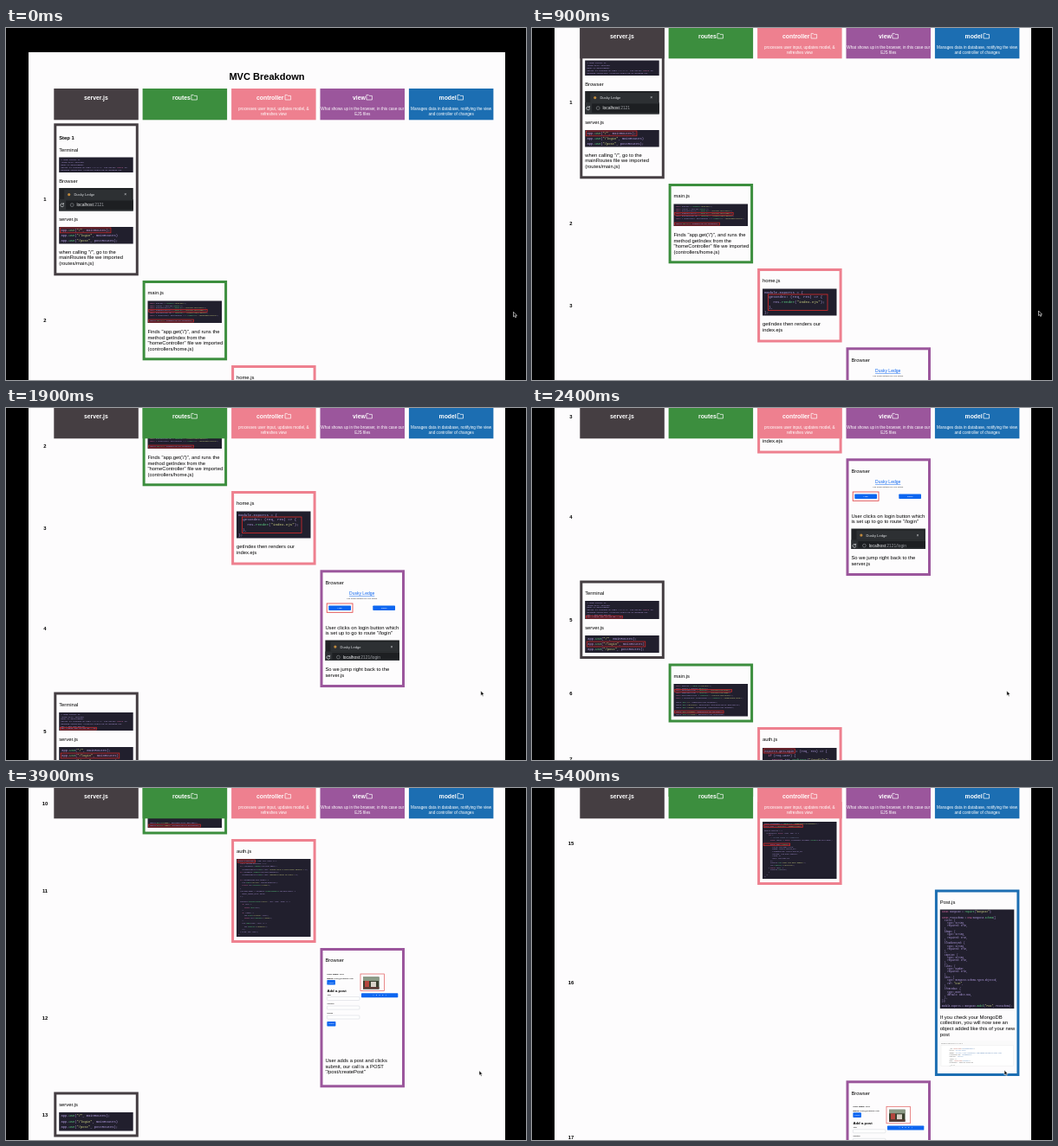
Recreate the animation shown at these times as an HTML page. Size 600 px wide and 407 px high, loop 5500 ms.

```html
<!DOCTYPE html>
<html lang="en">
<head>
<meta charset="utf-8">
<title>MVC Breakdown</title>
<style>
  html, body { margin: 0; width: 100%; height: 100%; overflow: hidden; background: #000; }
  svg { display: block; width: 600px; height: 407px; }
  text { font-family: "Liberation Sans", Arial, sans-serif; white-space: pre; }
  .code { font-family: "Liberation Mono", monospace; }
  .bold { font-weight: 700; }
  .mid { text-anchor: middle; }
  .mark { fill: #d0202018; stroke: #d92b2b; stroke-width: .7; }
</style>
</head>
<body>
<svg viewBox="0 0 600 407">
  <g id="page"></g>
  <g id="head"></g>
  <path id="cursor" d="M0 0V5.6L1.3 4.5L2.2 6.5L3.2 6L2.3 4.1H4Z" fill="#000" stroke="#fff" stroke-width=".6"/>
</svg>
<script>
const PAPER = '#fdfcfd', BLUE = '#0d66f0', BRAND = 'Dusky Ledge', TAGLINE = 'The Social Network For The Future';
const COLS = [55.3, 157.6, 260.1, 362.5, 464.9], WIDE = 97.5;
const HUES = ['#453e42', '#3c8e3e', '#ee808f', '#9b569c', '#1c6eb2'];

const rect = (x, y, w, h, fill, more = '') =>
  `<rect x="${x}" y="${y}" width="${w}" height="${h}" fill="${fill}" ${more}/>`;
const text = (x, y, str, size = 5.85, more = '') =>
  `<text x="${x}" y="${y}" font-size="${size}" ${more}>${str}</text>`;
const left = col => COLS[col] + 5.9;
const note = (col, y, ...lines) => lines.map((s, i) => text(left(col), y + i * 6.6, s)).join('');

// One bordered card with its row number; its file name sits at the top.
function card(row, col, top, bottom, name, body) {
  const h = bottom - top;
  return rect(COLS[col] + 1.5, top + 1.5, WIDE - 3, h - 3, PAPER, `stroke="${HUES[col]}" stroke-width="3"`)
    + text(45, top + h / 2 + 2.1, row, 5.85, 'class="bold mid"')
    + note(col, top + 16.4, name) + body;
}

const TOKEN = /("[^"]*")|(\/\/.*)|\b(const|return|if|new|async|await|try|catch)\b|(\w+)(?=\()/g;
const paint = line => line.replace(TOKEN, (m, str, comment, key) =>
  `<tspan fill="${str ? '#d9df88' : comment ? '#7480a8' : key ? '#ee72b4' : '#5fdc88'}">${m}</tspan>`);

// Dark editor shot; marks are [line, characters, line count].
function code(col, y, h, size, src, marks = [], pad = 2.2) {
  const lines = src.trim().split('\n'), step = (h - 2) / lines.length, x = left(col);
  return rect(x, y, 85.5, h, '#211f2d')
    + lines.map((s, i) => text(x + pad, y + 1 + step * (i + .5) + size * .3, paint(s), size, 'class="code" fill="#b9a3ea"')).join('')
    + marks.map(([line, chars, n = 1]) =>
      `<rect class="mark" x="${x + pad - 1}" y="${y + 1 + line * step}" width="${chars * size * .6 + 2}" height="${n * step}"/>`).join('');
}

// Dark browser window: tab strip and address bar.
function tab(col, y, h, path) {
  const x = left(col);
  return rect(x, y, 85.5, h, '#202225') + rect(x + 6, y + 2, 78, 11, '#2d3033') + rect(x, y + 13, 85.5, h - 13, '#2d3033')
    + rect(x + 8, y + 14.5, 77.5, 10.5 - (26.5 - h), '#1d1f22')
    + `<circle cx="${x + 11.5}" cy="${y + 7.6}" r="1.6" fill="#c08a3e"/>`
    + text(x + 17.2, y + 9, BRAND, 4.1, 'fill="#dfe1e4"') + text(x + 75, y + 9.2, '×', 5, 'fill="#dfe1e4"')
    + `<path d="M${x + 5} ${y + 18.6}a1.9 1.9 0 1 0 .4 1.6M${x + 5.3} ${y + 17.2}v1.7h-1.7" fill="none" stroke="#d5d7da" stroke-width=".7"/>`
    + `<circle cx="${x + 15}" cy="${y + 19.6}" r="1.9" fill="none" stroke="#a5a8ac" stroke-width=".5"/>`
    + text(x + 20.3, y + 21.4, `localhost<tspan fill="#9a9da2">:2121${path}</tspan>`, 4.9, 'fill="#f1f2f4"');
}

const pill = (x, y, w, h, str, size) => rect(x, y, w, h, BLUE, 'rx=".7"')
  + text(x + w / 2, y + h / 2 + size * .35, str, size, 'class="mid" fill="#fff"');
const brand = (x, y, size, sub, gap) =>
  text(x, y, BRAND, size, `class="mid" fill="${BLUE}" text-decoration="underline"`)
  + text(x, y + gap, TAGLINE, sub, 'class="mid" fill="#222"');
const field = (x, y, w, h, hue = '#cfd3d8') => rect(x, y, w, h, '#fff', `rx=".8" stroke="${hue}" stroke-width=".5"`);

function profile(y) {
  const x = 370.4;
  return text(x, y + 31, '<tspan class="bold">User Name:</tspan> Mira', 2.5) + text(x, y + 35.6, '<tspan class="bold">Email:</tspan> mira@example.com', 2.5)
    + pill(x, y + 37, 9.5, 5.6, 'Logout', 2)
    + text(x, y + 51, 'Add a post', 4.3, 'class="bold"')
    + text(x, y + 55, 'Title', 2.4) + field(x, y + 56.5, 37.5, 4)
    + text(x, y + 65, 'Caption', 2.4) + field(x, y + 67, 37.5, 4)
    + text(x, y + 76, 'Image', 2.4) + field(x, y + 78, 37.5, 4)
    + pill(x, y + 85, 10, 5.5, 'Submit', 2)
    + rect(409, y + 30, 27.5, 19.5, 'none', 'stroke="#e05a5a" stroke-width=".7"')
    + rect(412, y + 33.5, 18.5, 14, '#39402f') + rect(412, y + 33.5, 18.5, 4.5, '#8b9a86')
    + rect(414, y + 38, 5, 7, '#b4463e') + rect(421, y + 39, 6, 6, '#d8d2c8') + rect(412, y + 45, 18.5, 2.5, '#5b3a34')
    + pill(410, y + 52.3, 42.3, 5, '‹ &#160; • &#160; • &#160; • &#160; ›', 3);
}

const server = 'app.use("/", mainRoutes);\napp.use("/login", mainRoutes)\napp.use("/post", postRoutes);';
const load = (name, path) => `const ${name} = require("${path}");\n`;
const setup = load('express', 'express') + 'const router = express.Router();\n';
const guard = 'const { ensureAuth, ensureGuest } = require("../middleware/auth");\n';
const imports = setup + ['auth', 'home', 'posts'].map(n => load(n + 'Controller', '../controllers/' + n)).join('') + guard;
const index = '\nrouter.get("/", homeController.getIndex);\n';
const routes = imports + index + `router.get("/profile", ensureAuth, postsController.getProfile);
router.get("/feed", ensureAuth, postsController.getFeed);

router.get("/login", authController.getLogin);
router.post("/login", authController.postLogin);`;
const boot = `> node server.js
(node:4127) Warning
Mode is development
Server is running on PORT ********, you better catch it!
MongoDB Connected: cluster0-shard-00-01.mongodb.net`;
const home = `module.exports = {
  getIndex: (req, res) => {
    res.render("index.ejs");
  },
};`;
const getLogin = `exports.getLogin = (req, res) => {
  if (req.user) {
    return res.redirect("/profile");
  }
  res.render("login", {
    title: "Login",
  });
};`;
const postLogin = `exports.postLogin = (req, res, next) => {
  const validationErrors = [];
  if (!validator.isEmail(req.body.email))
    validationErrors.push({ msg: "Please enter a valid email address." });
  if (validator.isEmpty(req.body.password))
    validationErrors.push({ msg: "Password cannot be blank." });

  if (validationErrors.length) {
    req.flash("errors", validationErrors);
    return res.redirect("/login");
  }
  req.body.email = validator.normalizeEmail(req.body.email, {
    gmail_remove_dots: false,
  });

  passport.authenticate("local", (err, user, info) => {
    if (err) {
      return next(err);
    }
    if (!user) {
      req.flash("errors", info);
      return res.redirect("/login");
    }
    req.logIn(user, (err) => {
      res.redirect("/profile");
    });
  })(req, res, next);
};`;
const postRoutes = setup + load('upload', '../middleware/multer') + load('postsController', '../controllers/posts') + guard + `
//Post Routes
router.get("/:id", ensureAuth, postsController.getPost);

router.post("/createPost", upload.single("file"), postsController.createPost);`;
const createPost = load('cloudinary', '../middleware/cloudinary') + load('Post', '../models/Post') + `
module.exports = {
  createPost: async (req, res) => {
    try {
      // Upload image to cloudinary
      const result = await cloudinary.uploader.upload(req.file.path);

      await Post.create({
        title: req.body.title,
        image: result.secure_url,
        cloudinaryId: result.public_id,
        caption: req.body.caption,
        likes: 0,
        user: req.user.id,
      });
      console.log("Post has been added!");
      res.redirect("/profile");
    } catch (err) {
      console.log(err);
    }
  },
};`;
const prop = (name, type, rest = 'required: true') => `  ${name}: {\n    type: ${type},\n    ${rest},\n  },\n`;
const schema = load('mongoose', 'mongoose') + '\nconst PostSchema = new mongoose.Schema({\n'
  + prop('title', 'String') + prop('image', 'String') + prop('cloudinaryId', 'String') + prop('caption', 'String')
  + prop('likes', 'Number') + prop('user', 'mongoose.Schema.Types.ObjectId', 'ref: "User"') + prop('createdAt', 'Date', 'default: Date.now')
  + '});\n\nmodule.exports = mongoose.model("Post", PostSchema);';
const stored = ['_id: ObjectId("61f2a90c4be7")', 'title: "First post"', 'image: "https://res.cloudinary.com/image/upload/v1/post.jpg"',
  'cloudinaryId: "k2v8m0q4x7"', 'caption: "Hello"', 'likes: 0', 'user: ObjectId("61f2a7")', 'createdAt: 2022-01-27T14:10', '__v: 0'];

page.innerHTML = rect(26, 28, 550, 2600, PAPER)
  + text(301, 60, 'MVC Breakdown', 11.05, 'class="bold mid"')
  + card(1, 0, 110.3, 286.3, '', text(left(0), 129, 'Step 1', 5.85, 'class="bold"')
    + note(0, 143, 'Terminal') + code(0, 149.5, 17.5, 2.3, boot)
    + note(0, 178.8, 'Browser') + tab(0, 185, 26.5, '')
    + note(0, 223.3, 'server.js') + code(0, 230, 19.5, 3.77, server, [[0, 25]])
    + note(0, 260.6, 'when calling "/", go to the', 'mainRoutes file we imported', '(routes/main.js)'))
  + card(2, 1, 292, 384.3, 'main.js', code(1, 315.5, 25.5, 2.02, imports + index, [[3, 54], [7, 41]])
    + note(1, 352.9, 'Finds "app.get(\'/\')", and runs the', 'method getIndex from the', '"homeController" file we imported', '(controllers/home.js)'))
  + card(3, 2, 390, 475.5, 'home.js', code(2, 413.5, 31, 4.15, home, [[1, 0]].slice(1))
    + rect(272.5, 420, 68.5, 18.5, 'none', 'stroke="#d92b2b" stroke-width=".8"')
    + note(2, 456, 'getIndex then renders our', 'index.ejs'))
  + card(4, 3, 481.3, 617, 'Browser', brand(410.7, 510, 5, 2.24, 5)
    + pill(372.3, 522.6, 25.7, 5.4, 'Login', 2.2) + pill(423.3, 522.6, 25.7, 5.4, 'Signup', 2.2)
    + rect(370.2, 520, 29.8, 10.3, 'none', 'stroke="#e23b3b" stroke-width=".8"')
    + note(3, 549.5, 'User clicks on login button which', 'is set up to go to route "/login"')
    + tab(3, 562.5, 23.5, '/login') + note(3, 598, 'So we jump right back to the', 'server.js'))
  + card(5, 0, 622.5, 713, 'Terminal', code(0, 646, 21, 2.3, boot + '\nGET / 200 203.250 ms\nGET /login 200 78.191 ms - 20', [[6, 29]])
    + note(0, 679, 'server.js') + code(0, 686, 20, 3.77, server, [[1, 29]], 3))
  + card(6, 1, 718.5, 786.5, 'main.js', code(1, 742, 37.5, 1.97, routes, [[2, 54], [11, 46]]))
  + card(7, 2, 792, 865, 'auth.js', code(2, 816, 42, 3.55, getLogin, [[0, 16]]))
  + card(8, 3, 871, 990, 'Browser', brand(411.6, 900, 7.3, 2.56, 6.2)
    + text(379, 919.2, 'Email address', 3.25) + field(379, 921.5, 61.5, 7) + text(381, 926.2, 'mira@example.com', 3.2)
    + text(379, 935.2, 'Password', 3.25) + field(379, 937, 61.5, 7, '#6aaef5') + text(381, 941.7, 'Password', 3.2, 'fill="#8a8f96"')
    + pill(379, 947, 14, 7, 'Submit', 3)
    + note(3, 970.2, 'When user clicks submit, our call', 'is a POST "/login"'))
  + card(9, 0, 995.5, 1046, 'server.js', code(0, 1019, 20, 3.77, server, [[1, 29]], 3))
  + card(10, 1, 1051.5, 1122.5, 'main.js', code(1, 1075, 40, 2, routes, [[2, 54], [12, 48]]))
  + card(11, 2, 1128, 1248, 'auth.js', code(2, 1151, 90, 1.8, postLogin, [[0, 17]]))
  + card(12, 3, 1254, 1415.3, 'Browser', profile(1254)
    + note(3, 1386, 'User adds a post and clicks', 'submit, our call is a POST', '"/post/createPost"'))
  + card(13, 0, 1420.5, 1472.5, 'server.js', code(0, 1444, 21.5, 3.77, server))
  + card(14, 1, 1478.5, 1539, 'posts.js', code(1, 1502, 30, 1.78, postRoutes, [[3, 56], [9, 78]]))
  + card(15, 2, 1545, 1641, 'posts.js', code(2, 1568, 66, 1.9, createPost, [[1, 38], [9, 25]]))
  + card(16, 4, 1646.5, 1862, 'Post.js', code(4, 1669.5, 114.5, 2.6, schema)
    + note(4, 1795.8, 'If you check your MongoDB', 'collection, you will now see an', 'object added like this of your new', 'post')
    + rect(left(4), 1821, 85.5, 30, '#fafafa') + text(472, 1825.3, 'QUERY RESULTS 1-1 OF 1', 2, 'fill="#777"')
    + rect(472, 1826.5, 83.5, 24, '#fff', 'stroke="#e5e5e5" stroke-width=".4"')
    + stored.map((s, i) => text(481.5, 1831 + i * 2.35, paint(s).replace('#d9df88', '#4a78b0').replace('#5fdc88', '#a8443c'), 1.7, 'class="code" fill="#444"')).join(''))
  + card(17, 3, 1867.3, 1999, 'Browser', profile(1867.3));

// Column heads: name, name x, folder x, description lines.
const heads = [
  ['server.js', 90],
  ['routes', 192, 213.5],
  ['controller', 289, 321.7, 'processes user input, updates model, &amp;', 'refreshes view'],
  ['view', 400, 415.5, 'What shows up in the browser, in this case our', 'EJS files'],
  ['model', 499.6, 520.6, 'Manages data in database, notifying the view', 'and controller of changes'],
];
head.innerHTML = heads.map(([name, x, icon, ...info], i) =>
  rect(COLS[i], 70, WIDE, 36.3, HUES[i])
  + text(x, 82.7, name, 6.84, 'class="bold" fill="#fff"')
  + (icon ? `<path d="M${icon + .4} 77.4h2.3l.9 1h3.3v4.6h-6.5z" fill="none" stroke="#fff" stroke-width=".7" stroke-linejoin="round"/>` : '')
  + info.map((s, n) => text(COLS[i] + WIDE / 2, 95.4 + n * 5.8, s, 4.67, 'class="mid" fill="#fff"')).join('')).join('');

const LOOP = 5500, STEP = 100, PIN = 71;
const SCROLL = [[0, 0], [600, 66], [900, 112], [1900, 294], [2400, 423], [3300, 811], [4600, 1370], [5400, 1529], [5500, 1529]];
const POINTER = [[0, 585.5, 328.3], [900, 584.5, 327], [1000, 584.5, 327], [1200, 552.5, 327], [1800, 547.8, 327],
  [2400, 547.8, 327], [3300, 546.8, 327], [4600, 545, 326.3], [5500, 545, 326.3]];

function at(keys, t) {
  const i = keys.findIndex(k => k[0] > t), a = keys[i - 1], b = keys[i];
  const u = (t - a[0]) / (b[0] - a[0]);
  return a.slice(1).map((v, n) => v + (b[n + 1] - v) * u);
}

function draw(now) {
  const t = Math.floor(now % LOOP / STEP) * STEP;
  const y = Math.round(at(SCROLL, t)[0]);
  page.setAttribute('transform', `translate(0 ${-y})`);
  head.setAttribute('transform', `translate(0 ${-Math.min(y, PIN)})`);
  cursor.setAttribute('transform', `translate(${at(POINTER, t)})`);
  requestAnimationFrame(draw);
}
draw(0);
</script>
</body>
</html>
```
